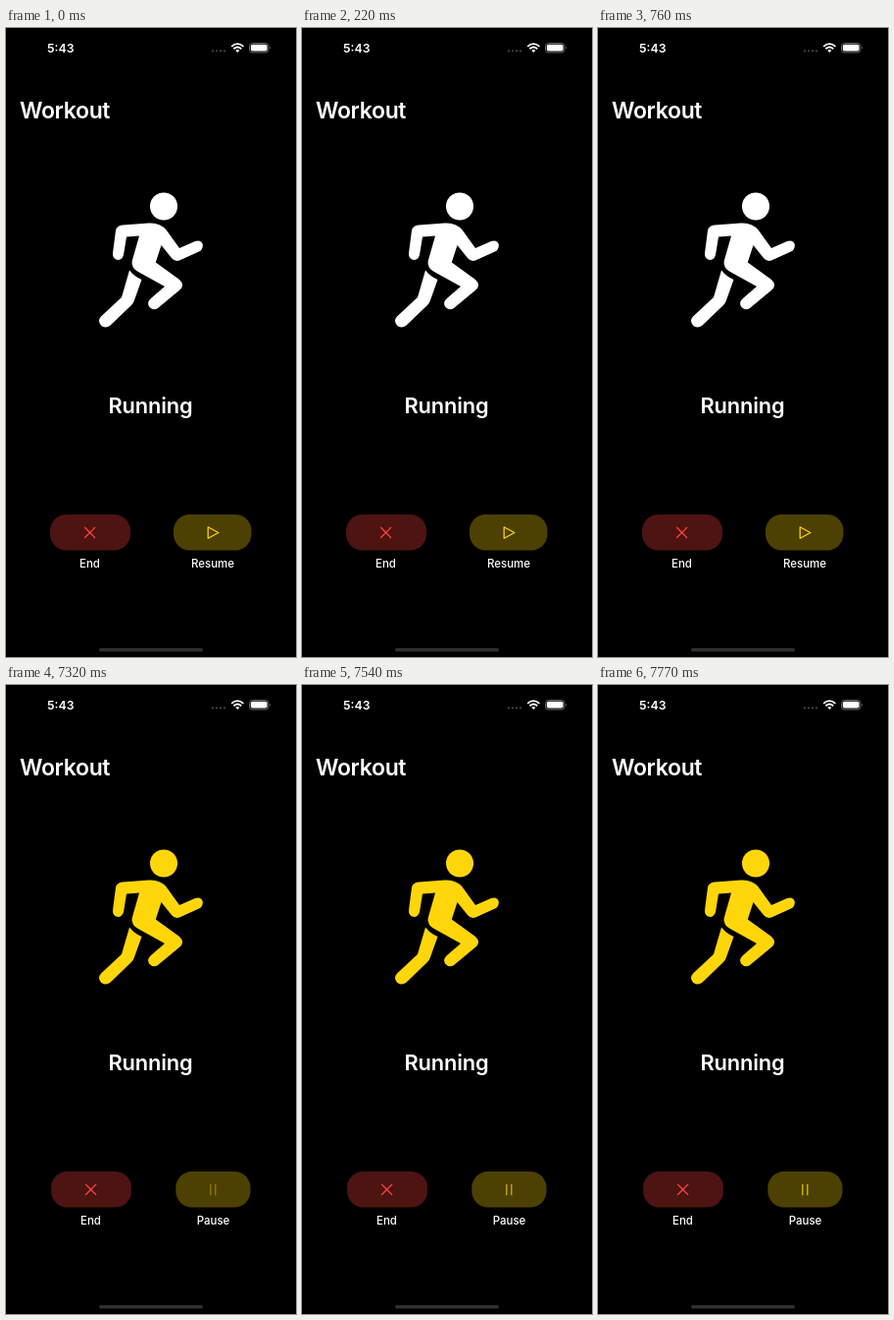
An HTML page that plays this animation: 296 px wide and 640 px high, repeating every 8000 ms.

```html
<!DOCTYPE html>
<html lang="en">
<head>
<meta charset="utf-8">
<title>Workout</title>
<style>
  html, body { margin: 0; width: 100%; height: 100%; overflow: hidden; background: #000; }
  svg { display: block; width: 100vw; height: 100vh; }
  text { font-family: Inter, "Liberation Sans", sans-serif; font-weight: 600; fill: #fff; }
  .label { font-size: 11.5px; font-weight: 500; text-anchor: middle; }
  .icon { fill: none; stroke-width: 1.25; stroke-linecap: round; stroke-linejoin: round; }
</style>
</head>
<body>
<svg viewBox="0 0 296 640">
  <rect width="296" height="640"/>

  <text x="42" y="24.6" font-size="12.3">5:43</text>
  <g fill="#484848">
    <circle cx="211" cy="23.3" r="1.1"/><circle cx="215" cy="23.3" r="1.1"/>
    <circle cx="219" cy="23.3" r="1.1"/><circle cx="223" cy="23.3" r="1.1"/>
  </g>
  <g fill="none" stroke="#fff" stroke-width="1.8">
    <path d="M230.2 18.8Q236.3 13.4 242.4 18.8"/>
    <path d="M232.4 21.2Q236.3 17.8 240.2 21.2"/>
  </g>
  <path d="M234.2 22.8Q236.3 21.2 238.4 22.8L236.3 25Z" fill="#fff"/>
  <rect x="248.5" y="15.5" width="19.4" height="9.4" rx="3" fill="none" stroke="#777" stroke-width=".9"/>
  <rect x="249.8" y="16.8" width="16.8" height="6.8" rx="1.8" fill="#fff"/>
  <path d="M269 18.6Q270.6 20.2 269 21.8Z" fill="#777"/>

  <text x="14" y="92" font-size="23" font-weight="700" letter-spacing="-.35">Workout</text>

  <g id="runner">
    <circle cx="161" cy="181.5" r="14"/>
    <path d="M112 206Q113 201 119 200.5L146 198.5Q158 198 164 206L177 224L193 217
      Q199 215 200.7 220Q201.5 225 197 227.5L177 236.5Q172 238 169 234L158.5 221
      L152.8 238.5L177 256Q182.5 261 178 266L155 285Q150 288 146 283.5Q143.5 279 148 275
      L162 263L134 247.5Q127 243 129 236L136 211.5L123 212.5L120 231Q118.5 236 114 236
      Q108.5 235 109 229Z"/>
    <path d="M126 246.5Q131 253 138.5 256L131 277Q130 280 128 282L106 303
      Q101 306 97 302.7Q93 298 97 293.5L118 274Z"/>
  </g>

  <text x="147.5" y="391.5" font-size="21.8" text-anchor="middle" letter-spacing="-.1">Running</text>

  <g id="end">
    <rect x="45" y="495" width="82" height="36.5" rx="16.5" fill="#4d1412"/>
    <path class="icon" stroke="#ff453a" d="M80.5 508.3L90.7 518.5M90.7 508.3L80.5 518.5"/>
    <text class="label" x="85.5" y="548.6">End</text>
  </g>

  <rect id="pill" y="495" height="36.5" rx="16.5" fill="#4d4003"/>
  <path id="play" class="icon" stroke="#ffd60a" d="M206.2 507.8V519.2L216.8 513.5Z"/>
  <path id="bars" class="icon" stroke="#ffd60a" d="M208.8 508.3V518.8M213.8 508.3V518.8"/>
  <text id="action" class="label" y="548.6"></text>

  <rect x="95" y="631" width="106" height="3.4" rx="1.7" fill="#30302d"/>
</svg>
<script>
const LOOP = 8000;
const RESUMED = 7320;
const FADE = [[7320, .42], [7430, .62], [7540, .76], [7660, .82], [7770, .86]];
const el = id => document.getElementById(id);
const set = (id, attrs) => {
  for (const key in attrs) el(id).setAttribute(key, attrs[key]);
};

function draw(t) {
  const active = t >= RESUMED;
  set("runner", { fill: active ? "#ffd60a" : "#fff" });
  set("end", { transform: `translate(${active ? 1 : 0} 0)` });
  set("pill", active ? { x: 173.3, width: 76.2 } : { x: 171, width: 79.5 });
  set("play", { opacity: active ? 0 : 1 });

  // The pause icon fades in with held steps.
  const step = FADE.filter(([at]) => t >= at).pop();
  set("bars", { opacity: step ? step[1] : 0 });

  set("action", { x: active ? 211.5 : 211 });
  el("action").textContent = active ? "Pause" : "Resume";
}

const start = performance.now();
function tick() {
  draw((performance.now() - start) % LOOP);
  requestAnimationFrame(tick);
}
tick();
</script>
</body>
</html>
```
